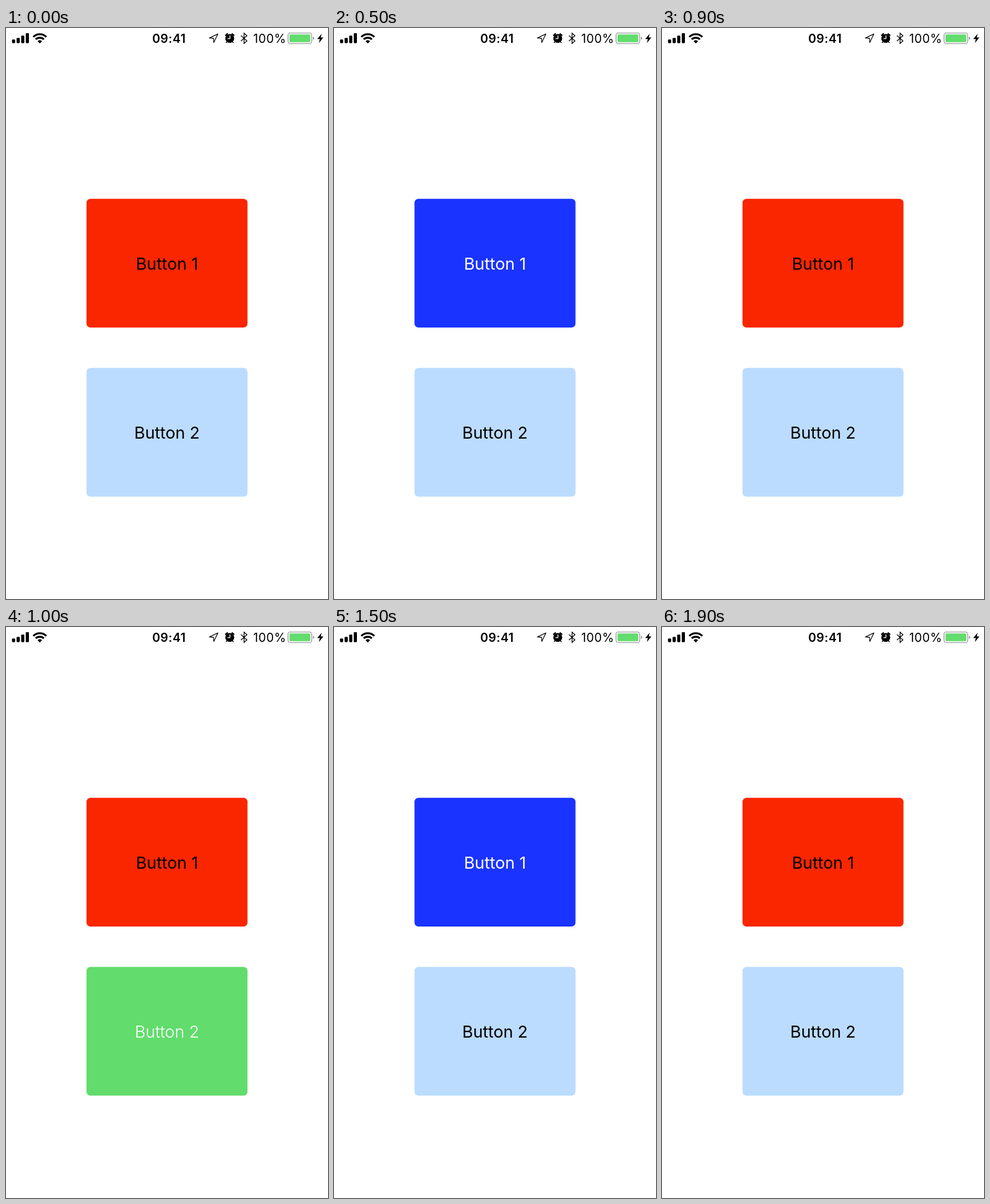
Recreate the animation shown at these times as an HTML page. Size 562 px wide and 997 px high, loop 2 s.

```html
<!DOCTYPE html>
<html lang="en">
<head>
<meta charset="utf-8">
<title>Two buttons</title>
<style>
  html, body { margin: 0; width: 100%; height: 100%; overflow: hidden; background: #fff; }
  svg { display: block; width: 562px; height: 997px; }
  text { font-family: Inter, Roboto, sans-serif; text-anchor: middle; }
  .label { font-size: 29px; letter-spacing: -.1px; }
  .status { font-size: 21px; letter-spacing: .5px; }
  .line { fill: none; stroke: #000; }
</style>
</head>
<body>
<svg viewBox="0 0 562 997">
  <!-- signal -->
  <rect x="10.5" y="20" width="5.5" height="6.5" rx="1.4"/>
  <rect x="18.5" y="17.2" width="5.5" height="9.3" rx="1.4"/>
  <rect x="26.5" y="13.3" width="5.5" height="13.2" rx="1.4"/>
  <rect x="34.5" y="9" width="5.5" height="17.5" rx="1.4"/>

  <!-- wifi -->
  <path d="M59 27 55 23A5.7 5.7 0 0 1 63 23Z"/>
  <path class="line" stroke-width="3.4" d="M51.9 19.9A10 10 0 0 1 66.1 19.9M47.6 15.6A16.1 16.1 0 0 1 70.4 15.6"/>

  <text class="status" x="284.5" y="25.5" font-weight="600">09:41</text>

  <!-- location -->
  <path class="line" stroke-width="1.3" stroke-linejoin="round" d="M369.8 10.3 355 17.4 362.2 18 362.7 25.3Z"/>

  <!-- alarm -->
  <circle cx="390.5" cy="18.2" r="7.8"/>
  <path class="line" stroke-width="2.4" d="M382.7 13.4 387 9.7M398.3 13.4 394 9.7"/>
  <path class="line" stroke-width="1.5" d="M386 23.5 384 26M395 23.5 397 26"/>
  <path class="line" stroke-width="1.4" style="stroke: #fff" d="M390.8 13V18.6H386.5"/>

  <!-- bluetooth -->
  <path class="line" stroke-width="1.4" d="M410 13.3 420.5 22.6 415.5 27V9L420.5 13.4 410 22.7"/>

  <text class="status" x="460.3" y="25.5">100%</text>

  <!-- battery -->
  <rect x="492.3" y="8.8" width="41.2" height="18.4" rx="3.8" fill="none" stroke="#a3a6a8" stroke-width="1.6"/>
  <rect x="494.8" y="11.2" width="36.2" height="13.6" rx="1.8" fill="#62dc6c"/>
  <path d="M535.6 15Q538.2 15.6 538.2 18T535.6 21Z" fill="#a3a6a8"/>
  <path d="M551 10 543.2 19.2H547.8L546 26.3 554 16.6H549.3Z"/>

  <rect id="box1" x="140.5" y="298.3" width="281" height="224.7" rx="7"/>
  <text id="label1" class="label" x="281" y="421.7">Button 1</text>
  <rect id="box2" x="140.5" y="593.5" width="281" height="224.7" rx="7"/>
  <text id="label2" class="label" x="281" y="716.5">Button 2</text>
</svg>
<script>
const LOOP = 2000;
const buttons = [
  { id: 1, idle: '#f92600', pressed: '#1a33ff', weight: 400, presses: [[300, 600], [1500, 1900]] },
  { id: 2, idle: '#bbdcff', pressed: '#62dc6c', weight: 300, presses: [[1000, 1200]] }
];
const find = id => document.getElementById(id);

function draw(now) {
  const t = now % LOOP;
  for (const b of buttons) {
    const down = b.presses.some(([from, to]) => t >= from && t < to);
    const label = find('label' + b.id);
    find('box' + b.id).setAttribute('fill', down ? b.pressed : b.idle);
    label.setAttribute('fill', down ? '#fff' : '#000');
    label.setAttribute('font-weight', down ? b.weight : 400);
  }
}

const start = performance.now();
function tick() {
  draw(performance.now() - start);
  requestAnimationFrame(tick);
}
tick();
</script>
</body>
</html>
```
